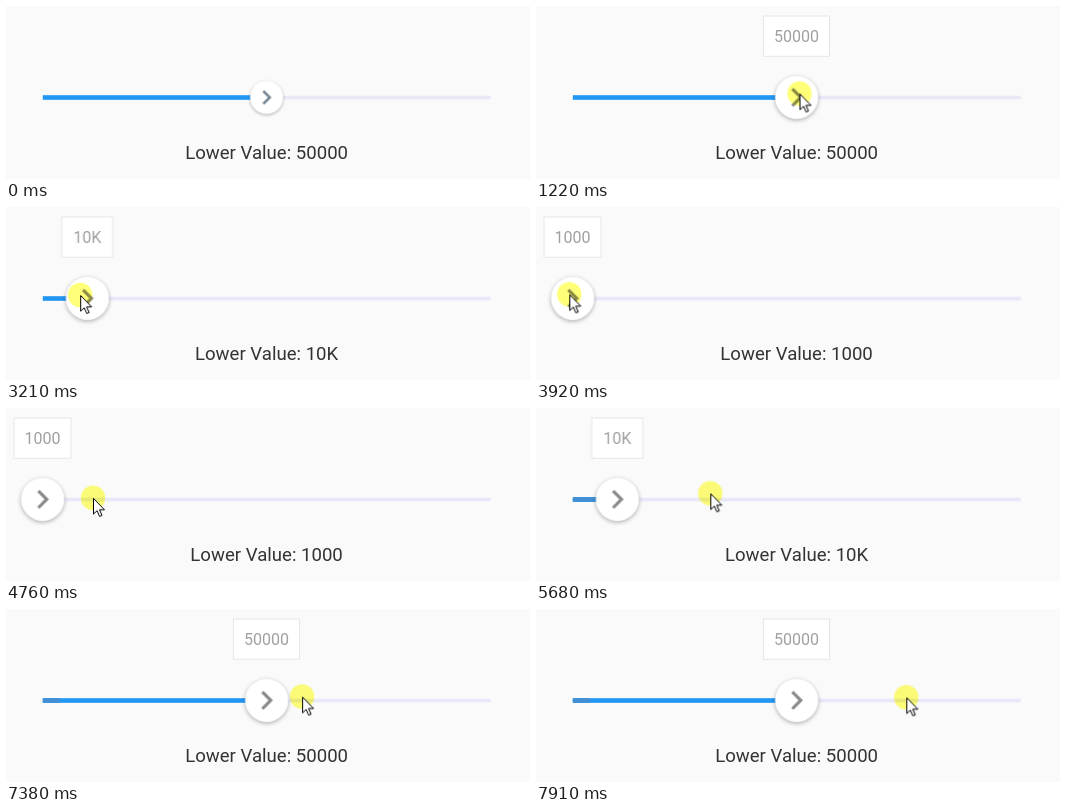
An HTML page for the animation above (8 s loop, 524x173 px).

```html
<!DOCTYPE html>
<html lang="en">
<head>
<meta charset="utf-8">
<title>Slider with fixed values</title>
<style>
  html, body { margin: 0; width: 100%; height: 100%; overflow: hidden; background: #fafafa; }
  svg { display: block; width: 100%; height: 100%; }
  text { font-family: Roboto, Arial, sans-serif; text-anchor: middle; }
  .caption { font-size: 18.6px; fill: #333; }
  .tip text { font-size: 16px; fill: #a0a0a0; }
  .tip rect { fill: #fff; stroke: #e6e6e6; }

  .knob, .fill, .stub, .v50, .v10, .v1 { animation: 8s step-end infinite; }
  .knob { animation-name: slide; }
  .fill { animation-name: fill; }
  .stub { animation-name: stub; }
  .v50 { animation-name: v50; }
  .v10 { animation-name: v10; }
  .v1 { animation-name: v1; }
  .grow { animation: grow 8s linear infinite; }
  .icon { animation: tint 8s step-end infinite; }
  .tip { animation: rise 8s linear infinite; }
  .pointer { animation: point 8s step-end infinite; }
  .spot { fill: #ffff78; mix-blend-mode: multiply; }

  @keyframes slide {
    0%, 82.625%, 100% { transform: translateX(224px); }
    31.625%, 60.5% { transform: translateX(44.8px); }
    44% { transform: translateX(0); }
  }
  @keyframes fill {
    0%, 82.625%, 100% { width: 224px; }
    31.625%, 60.5% { width: 44.8px; }
    44% { width: 0; }
  }
  @keyframes stub {
    0%, 100% { width: 0; }
    60.5% { width: 44.8px; }
    82.625% { width: 17.4px; }
  }
  @keyframes v50 {
    0%, 82.625%, 100% { opacity: 1; }
    31.625% { opacity: 0; }
  }
  @keyframes v10 {
    0%, 44%, 82.625%, 100% { opacity: 0; }
    31.625%, 60.5% { opacity: 1; }
  }
  @keyframes v1 {
    0%, 60.5%, 100% { opacity: 0; }
    44% { opacity: 1; }
  }

  /* press feedback */
  @keyframes grow {
    0%, 10.9% { transform: scale(1); animation-timing-function: ease-out; }
    15.2%, 100% { transform: scale(1.3); }
  }
  @keyframes tint {
    0% { fill: #6f7f8f; }
    12.375%, 100% { fill: #8a8a8a; }
  }
  @keyframes rise {
    0%, 10.7% { transform: translateY(38px); opacity: 0; }
    15.2%, 100% { transform: none; opacity: 1; }
  }

  @keyframes point {
    0% { transform: translate(360px, 220px); }
    1.75% { transform: translate(353px, 182px); animation-timing-function: steps(10, start); }
    11.375% { transform: translate(263.5px, 87.5px); }
    17.125% { transform: translate(263.5px, 87.5px); animation-timing-function: steps(11, start); }
    27.625% { transform: translate(107.3px, 86.3px); animation-timing-function: steps(7, start); }
    34.45% { transform: translate(83px, 88px); }
    40.125% { transform: translate(83px, 88px); animation-timing-function: steps(6, start); }
    45.98% { transform: translate(30px, 88px); }
    49% { transform: translate(33.3px, 87.3px); }
    49.9% { transform: translate(33.3px, 87.3px); animation-timing-function: steps(10, start); }
    59.5% { transform: translate(85px, 90px); animation-timing-function: steps(3, start); }
    62.375% { transform: translate(91px, 89.5px); }
    67.25% { transform: translate(91px, 89.5px); animation-timing-function: steps(5, start); }
    71.875% { transform: translate(174.3px, 85.3px); animation-timing-function: steps(6, start); }
    77.75% { transform: translate(253px, 84px); animation-timing-function: steps(3, start); }
    80.625% { transform: translate(256px, 84.5px); }
    81.625% { transform: translate(256px, 84.5px); animation-timing-function: steps(3, start); }
    84.5% { transform: translate(264.3px, 87.3px); }
    90.25% { transform: translate(264.3px, 87.3px); animation-timing-function: steps(10, start); }
    99.8%, 100% { transform: translate(370.3px, 88.3px); }
  }
</style>
</head>
<body>
<svg viewBox="0 0 524 173">
  <rect width="524" height="173" fill="#fafafa"/>

  <rect x="36.8" y="89.7" width="448" height="3.7" fill="#e8e8f8"/>
  <rect class="fill" x="36.8" y="89.2" width="224" height="4.6" fill="#2196f3"/>
  <rect class="stub" x="36.8" y="89.2" width="0" height="4.6" fill="#4190d6"/>

  <g class="knob">
    <g transform="translate(36.6 91.4)">
      <g class="grow">
        <circle r="16.6" fill="#fff" style="filter: drop-shadow(0 1px 1.7px rgba(0,0,0,.32))"/>
        <path class="icon" transform="scale(1.22) translate(-12 -12)"
              d="M10 6L8.59 7.41 13.17 12l-4.58 4.59L10 18l6-6z"/>
      </g>
    </g>
    <g class="tip">
      <g class="v50">
        <rect x="3.5" y="10" width="66" height="40.3"/>
        <text x="36.6" y="35.8">50000</text>
      </g>
      <g class="v10">
        <rect x="11" y="10" width="51" height="40.3"/>
        <text x="36.6" y="35.8">10K</text>
      </g>
      <g class="v1">
        <rect x="8" y="10" width="57" height="40.3"/>
        <text x="36.6" y="35.8">1000</text>
      </g>
    </g>
  </g>

  <g class="caption">
    <text class="v50" x="260.6" y="153.3">Lower Value: 50000</text>
    <text class="v10" x="260.6" y="153.3">Lower Value: 10K</text>
    <text class="v1" x="260.6" y="153.3">Lower Value: 1000</text>
  </g>

  <circle class="pointer spot" r="12.2"/>
  <path class="pointer" fill="#fff" stroke="#000" stroke-width="1"
        d="M.5 .5V16.2L4.1 12.8L6.6 18.5L9 17.5L6.5 11.9H11.5Z"/>
</svg>
</body>
</html>
```
